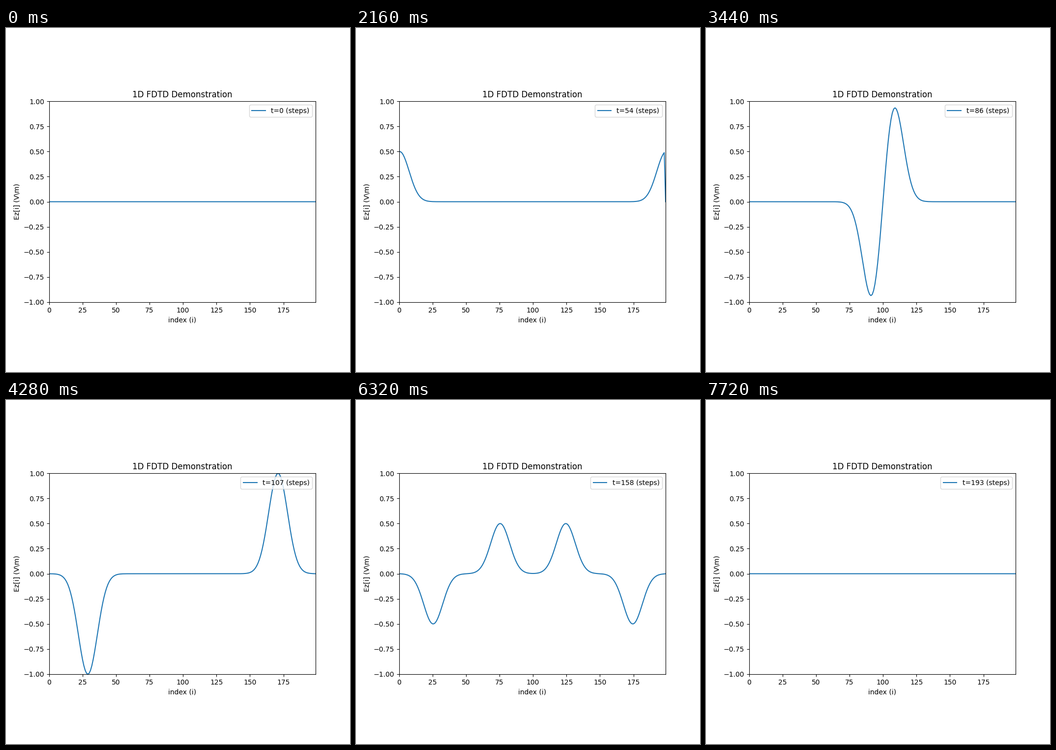
These frames come from a looping animation (700 by 700 pixels, 7760 ms). A matplotlib script:

```python
import numpy as np
import matplotlib.pyplot as plt
from matplotlib.animation import FuncAnimation

CELLS = 200
FRAMES = 194
STEPS_PER_FRAME = 3

# (cell, peak step, sign): soft sources radiate half the pulse each way
SOFT = [(67, 30, 1), (133, 30, 1), (50, 400, 1), (100, 400, -1), (150, 400, 1)]
# (cell, peak step, sign, direction): one-way sources radiate the full pulse
ONE_WAY = [(50, 200, 1, 1), (150, 200, -1, -1)]

cells = np.arange(CELLS)


def pulse(t):
    return np.exp(-t**2 / 100)


def field(step):
    ez = np.zeros(CELLS)
    for cell, peak, sign in SOFT:
        ez += 0.5 * sign * pulse(step + 0.5 - peak - abs(cells - cell))
    for cell, peak, sign, direction in ONE_WAY:
        dist = (cells - cell) * direction
        ez += np.where(dist >= 0, sign * pulse(step - peak - dist), 0)
    ez[-1] = 0  # conducting end wall
    return ez


fig, ax = plt.subplots(figsize=(7, 7), dpi=100)
ax.set_xlim(0, CELLS - 1)
ax.set_ylim(-1, 1)
ax.set_aspect(75)
ax.set_title("1D FDTD Demonstration")
ax.set_xlabel("index (i)")
ax.set_ylabel("Ez[i] (V\\m)")

line, = ax.plot(cells, field(0), label="t=0 (steps)")
line.set_snap(False)
label = ax.legend(loc="upper right").get_texts()[0]


def update(frame):
    line.set_ydata(field(frame * STEPS_PER_FRAME))
    label.set_text(f"t={frame} (steps)")
    return line, label


anim = FuncAnimation(fig, update, frames=FRAMES, interval=40, repeat=True,
                     repeat_delay=0, blit=False)
plt.show()
```
